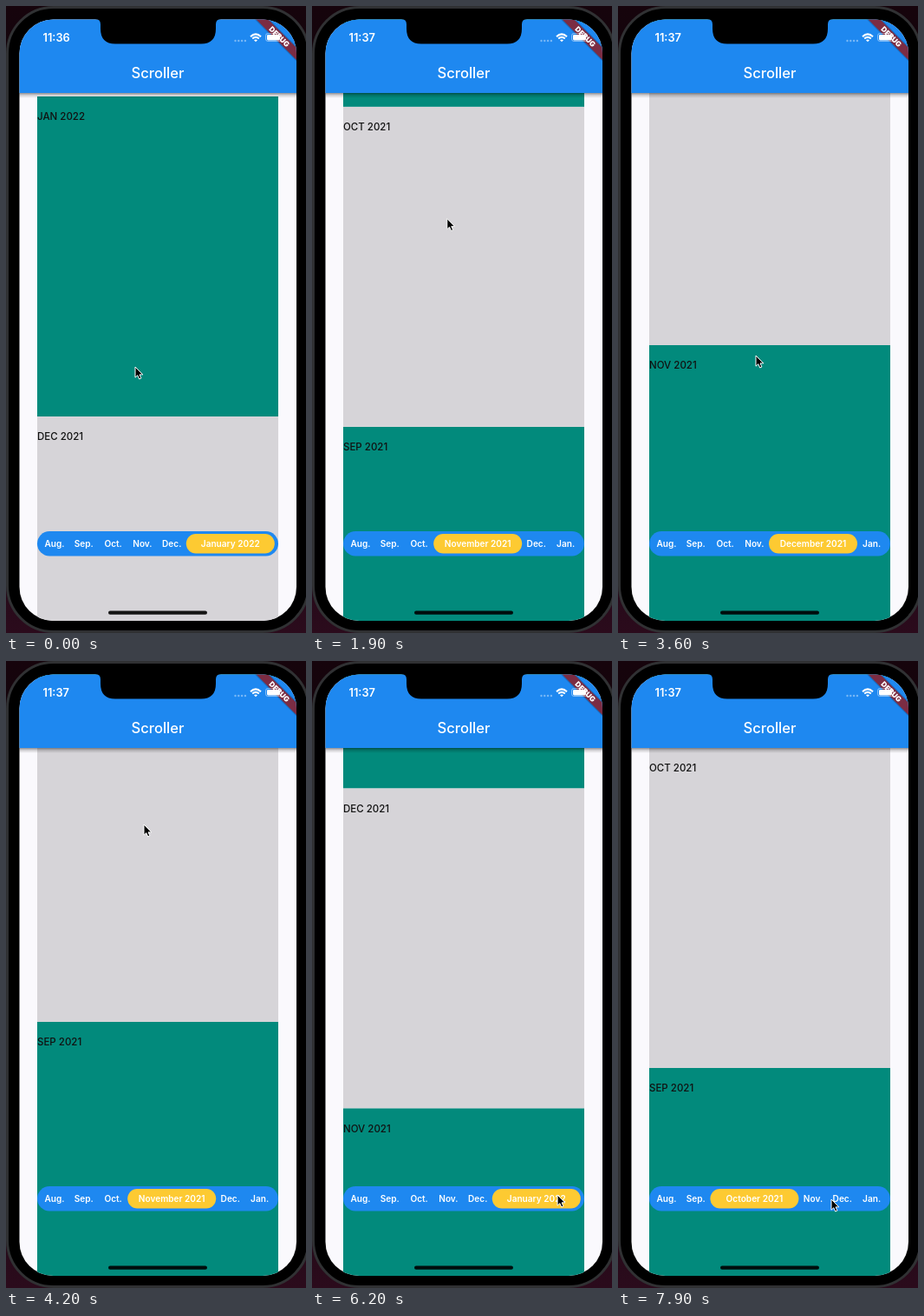
An HTML page that plays this animation: 346x721 px, repeating every 8 s.

```html
<!DOCTYPE html>
<html lang="en">
<head>
<meta charset="utf-8">
<title>Scroller</title>
<style>
  html, body { margin: 0; width: 100%; height: 100%; overflow: hidden; background: #0d0409; }
  svg { display: block; width: 100%; height: 100%; font-family: Inter, Roboto, sans-serif; }
  .month { font-size: 11.5px; font-weight: 500; fill: #111; }
  .tab { font-size: 10.1px; font-weight: 600; fill: #fff; text-anchor: middle; }
</style>
</head>
<body>
<svg viewBox="0 0 346 721">
  <defs>
    <clipPath id="screen"><rect x="15.5" y="15.5" width="319.5" height="691.5" rx="39"/></clipPath>
    <linearGradient id="backdrop" x2="0" y2="1">
      <stop offset="0" stop-color="#16040c"/><stop offset=".5" stop-color="#08060a"/><stop offset="1" stop-color="#2b0b1c"/>
    </linearGradient>
    <linearGradient id="shade" x2="0" y2="1">
      <stop offset="0" stop-opacity=".42"/><stop offset=".45" stop-opacity=".16"/><stop offset="1" stop-opacity="0"/>
    </linearGradient>
  </defs>

  <rect width="346" height="721" fill="url(#backdrop)"/>
  <rect x="1.5" y="1.5" width="347.5" height="718" rx="53" fill="#000" stroke="#303133" stroke-width="3"/>

  <g clip-path="url(#screen)">
    <rect x="15" y="15" width="321" height="693" fill="#faf9fd"/>
    <g id="list"></g>
    <rect x="15" y="100" width="321" height="6" fill="url(#shade)"/>
    <rect x="15" y="15" width="321" height="85" fill="#1e88f0"/>
    <text x="175" y="83" font-size="16.6" font-weight="500" fill="#fff" text-anchor="middle">Scroller</text>

    <rect x="36" y="604" width="278" height="28.5" rx="14.25" fill="#1e88f0"/>
    <rect id="pill" y="607" width="102" height="22.5" rx="11.25" fill="#fdca32"/>
    <g id="tabs"></g>

    <g transform="translate(335 15.5) rotate(45)">
      <rect x="-40" y="22" width="80" height="12" fill="#000" opacity=".2"/>
      <rect x="-40" y="23" width="80" height="9.8" fill="#7b2c43"/>
    </g>
    <g fill="#fff">
      <text id="clock" x="42.5" y="41" font-size="12.8" font-weight="600"></text>
      <g opacity=".4">
        <circle cx="264.5" cy="40" r="1.2"/><circle cx="268.3" cy="40" r="1.2"/>
        <circle cx="272.1" cy="40" r="1.2"/><circle cx="275.9" cy="40" r="1.2"/>
      </g>
      <g fill="none" stroke="#fff" stroke-width="2">
        <path d="M282 35.2Q288 29.5 294 35.2M284.2 37.6Q288 34.2 291.8 37.6"/>
      </g>
      <path d="M286 39.2Q288 37.6 290 39.2L288 41.3Z"/>
      <rect x="299.5" y="31.5" width="18" height="9" rx="2.6" fill="none" stroke="#fff" stroke-opacity=".45"/>
      <rect x="301" y="33" width="15" height="6.5" rx="1.4"/>
      <text transform="translate(335 15.5) rotate(45)" x="0" y="31" font-size="8.4" font-weight="900" text-anchor="middle">DEBUG</text>
    </g>
    <rect x="118" y="695.6" width="114" height="4.2" rx="2.1" opacity=".9"/>
  </g>

  <path d="M103 15H248Q242 15 242 21V26Q242 43.5 225 43.5H126Q109 43.5 109 26V21Q109 15 103 15Z"/>
  <path id="cursor" d="M0 0V12.2L2.8 9.7L4.7 14L6.9 13L5 8.9H8.8Z" fill="#000" stroke="#fff" stroke-width="1" stroke-linejoin="round"/>
</svg>

<script>
const LOOP = 8000, SECTION = 368, LIST_TOP = 104;
const MONTHS = ['August', 'September', 'October', 'November', 'December', 'January'];
const yearOf = i => i === 5 ? 2022 : 2021;
const shortName = i => MONTHS[i].slice(0, 3);

const EASE = {
  lin: p => p,
  in: p => p * p,
  out: p => 1 - (1 - p) ** 2,
  fling: p => 1 - (1 - p) ** 3,
  both: p => p * p * (3 - 2 * p),
};

// Each key: time, easing toward it, values.
const SCROLL = [
  [0, 'lin', 0], [650, 'lin', 0], [900, 'in', 175], [1200, 'lin', 579], [2150, 'out', 1130],
  [2400, 'in', 985], [2700, 'lin', 693], [3200, 'out', 450], [3700, 'lin', 450],
  [3950, 'in', 664], [4200, 'lin', 1160], [5200, 'fling', 1511], [5850, 'lin', 1511],
  [6350, 'both', 4], [7080, 'lin', 4], [7580, 'both', 1108],
];
const POINTER = [
  [0, 'lin', 149, 415], [650, 'lin', 149, 415], [900, 'in', 154, 240], [2150, 'both', 156, 245],
  [2400, 'in', 159, 402], [3700, 'lin', 159, 402], [3950, 'in', 159, 188], [4300, 'lin', 159, 188],
  [5400, 'both', 231, 542], [5800, 'both', 290, 614], [6100, 'lin', 290, 614],
  [6900, 'both', 132, 613], [7400, 'lin', 132, 613], [7900, 'both', 246, 619],
];
// Selected month, which trails the list while it is flung.
const SELECTED = [
  [0, 5], [1050, 4], [1450, 3], [1950, 2], [2750, 3], [3050, 4],
  [4080, 3], [4300, 2], [4750, 1], [5850, 5], [7080, 2],
];

function track(keys, t) {
  const n = keys.findIndex(k => k[0] > t);
  if (n < 0) return keys.at(-1).slice(2);
  const [t0, , ...from] = keys[n - 1];
  const [t1, ease, ...to] = keys[n];
  const p = EASE[ease]((t - t0) / (t1 - t0));
  return from.map((v, i) => v + (to[i] - v) * p);
}

const $ = id => document.getElementById(id);

function add(parent, tag, attrs, text = '') {
  const el = document.createElementNS('http://www.w3.org/2000/svg', tag);
  for (const name in attrs) el.setAttribute(name, attrs[name]);
  el.textContent = text;
  return parent.appendChild(el);
}

MONTHS.forEach((_, i) => {
  const y = LIST_TOP + (5 - i) * SECTION;
  add($('list'), 'rect', { x: 36, y, width: 278, height: SECTION, fill: i % 2 ? '#028a7c' : '#d6d4d8' });
  add($('list'), 'text', { x: 36, y: y + 27.3, class: 'month' }, `${shortName(i).toUpperCase()} ${yearOf(i)}`);
});
const tabs = MONTHS.map(() => add($('tabs'), 'text', { y: 622, class: 'tab' }));

function render(t) {
  const [scroll] = track(SCROLL, t);
  const [x, y] = track(POINTER, t);
  const selected = SELECTED.findLast(k => k[0] <= t)[1];
  const slot = n => 56 + 33.8 * n;

  $('list').setAttribute('transform', `translate(0 ${-scroll})`);
  $('cursor').setAttribute('transform', `translate(${x} ${y})`);
  $('clock').textContent = t < 600 ? '11:36' : '11:37';
  $('pill').setAttribute('x', slot(selected + 1) - 51);
  tabs.forEach((tab, i) => {
    tab.setAttribute('x', slot(i + 1 + Math.sign(i - selected)));
    tab.textContent = i === selected ? `${MONTHS[i]} ${yearOf(i)}` : `${shortName(i)}.`;
  });
}

const start = performance.now();
function tick() {
  render((performance.now() - start) % LOOP);
  requestAnimationFrame(tick);
}
tick();
</script>
</body>
</html>
```
